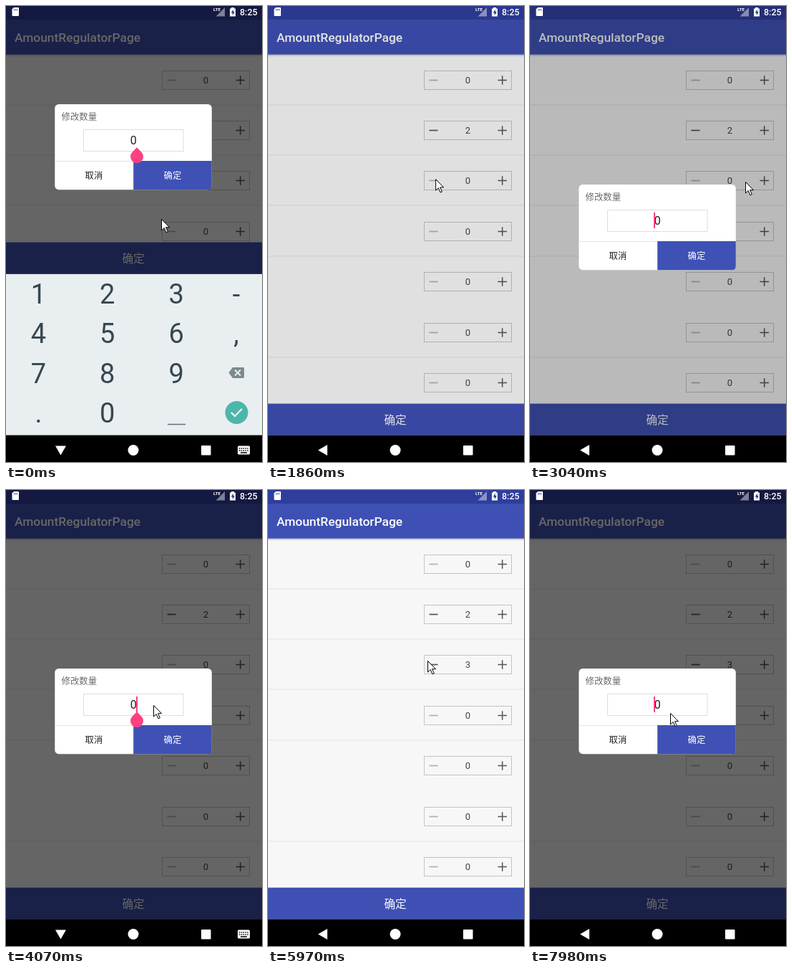
These frames come from a looping animation (358 by 636 pixels, 8 s). An HTML page:

```html
<!DOCTYPE html>
<html lang="zh">
<head>
<meta charset="utf-8">
<style>
html, body { margin: 0; width: 100%; height: 100%; overflow: hidden; background: #000; }
svg { display: block; width: 358px; height: 636px; font-family: Roboto, "Noto Sans CJK SC", "Noto Sans CJK", sans-serif; }
</style>
</head>
<body>
<svg id="stage" viewBox="0 0 358 636"></svg>
<script>
const LOOP = 8000, BLINK = 950, GLIDE = 400;
const BLUE = '#3f51b5', PINK = '#ff4081';
const HEADER_END = 67.7, NAV_TOP = 598.6, FOOTER_HEIGHT = 44, KEYPAD_HEIGHT = 225;

// Each edit opens the dialog, focuses the field, types a digit and closes with a press.
const EDITS = [
  { row: 1, digit: 2, open: -1600, focus: -600, type: 960, close: 1710 },
  { row: 2, digit: 3, open: 2930, focus: 3900, type: 4740, close: 5750 },
  { row: 3, digit: 0, open: 7020, focus: Infinity, type: Infinity, close: Infinity },
];

// The pointer glides to each stop and rests there from the given time on.
const STOPS = [
  { at: 0, x: 217, y: 297 }, { at: 1470, x: 234, y: 241 }, { at: 2250, x: 277, y: 345 },
  { at: 2640, x: 301, y: 245 }, { at: 3600, x: 206, y: 300 }, { at: 5170, x: 223, y: 238 },
  { at: 6670, x: 291, y: 310 }, { at: 7580, x: 196, y: 311 },
];

const progress = (t, start, length) => Math.min(1, Math.max(0, (t - start) / length));
const easeOut = p => 1 - (1 - p) ** 2;
const easeInOut = p => p * p * (3 - 2 * p);

const rect = (x, y, w, h, fill, extra = '') =>
  `<rect x="${x}" y="${y}" width="${w}" height="${h}" fill="${fill}" ${extra}/>`;
const circle = (x, y, r, fill) => `<circle cx="${x}" cy="${y}" r="${r}" fill="${fill}"/>`;
const path = (d, fill, extra = '') => `<path d="${d}" fill="${fill}" ${extra}/>`;
const line = (d, color, width = 1) => path(d, 'none', `stroke="${color}" stroke-width="${width}"`);
const label = (text, x, y, size, fill, extra = 'text-anchor="middle"') =>
  `<text x="${x}" y="${y}" font-size="${size}" fill="${fill}" ${extra}>${text}</text>`;
const group = (x, y, body, extra = '') => `<g transform="translate(${x} ${y})" ${extra}>${body}</g>`;

function quantityRow(i, value) {
  const body = (i === 4 ? '' : rect(0, 34.5, 358, 1, '#e8e8e8'))
    + rect(218.5, -12.5, 122, 26, 'none', 'stroke="#c6c6c6"')
    + line('M225.500 .5h12', value ? '#555' : '#b2b2b2', 1.7)
    + line('M321.500 .5h12.500M327.700 -5.800v12.600', '#555', 1.5)
    + label(value, 279.5, 5, 13, '#444');
  return group(0, Math.floor(103 + 70.42 * i), body);
}

function activity(t, keypadShown) {
  const footer = NAV_TOP - FOOTER_HEIGHT - KEYPAD_HEIGHT * keypadShown;
  const valueOf = i => EDITS.find(e => e.row === i && t >= e.close)?.digit ?? 0;
  const rows = Array.from({ length: 7 }, (_, i) => quantityRow(i, valueOf(i))).join('');
  const shadow = [.22, .1, .04].map((alpha, i) => rect(0, HEADER_END + i, 358, 1, '#000', `opacity="${alpha}"`));
  return rect(0, 0, 358, 599, '#fafafa') + rows + shadow.join('')
    + rect(0, 0, 358, 19, '#303f9f') + rect(0, 19, 358, HEADER_END - 19, BLUE)
    + label('AmountRegulatorPage', 12, 50, 17.4, '#fff', 'font-weight="500"')
    + rect(0, footer, 358, FOOTER_HEIGHT, BLUE) + label('确定', 178, footer + 28.3, 15.6, '#fff');
}

function statusBar() {
  return path('M11 2h6q1 0 1 1v10q0 1-1 1h-7.500q-1 0-1-1v-8.500z', '#fff')
    + line('M11.500 4v2.500M13.500 4v2.500M15.500 4v2.500', '#303f9f', .9)
    + label('LTE', 290, 7, 6.2, '#fff', 'font-weight="700"')
    + path('M306 2v12.500h-12.500z', '#fff', 'opacity=".45"')
    + path('M315 2h4v1.500h2v11h-8v-11h2z', '#fff') + path('M317.800 5l-3 4.500h2v3.500l3-4.700h-2z', '#222c6c')
    + label('8:25', 327, 13, 12.5, '#fff', 'font-weight="500"');
}

function navBar(open) {
  const keys = [0, 1, 2, 3, 4].map(i => `M${326 + i * 2.8} 617h1.500m-1.500 3h1.500`).join('');
  return rect(0, NAV_TOP, 358, 38, '#000')
    + path(open ? 'M69 613.500h15l-7.500 13z' : 'M70 619.500l13-7.500v15z', '#fff')
    + circle(178, 619.5, 7.5, '#fff')
    + rect(273, 613, 13.5, 13.5, '#fff', 'rx="1"')
    + (open ? rect(324, 613.5, 17, 12, '#fff', 'rx="1.5"') + line(keys + 'M328 623h9', '#000', 1.4) : '');
}

function keypad(shown) {
  if (!shown) return '';
  const keys = ['123-', '456,', '789', '.0'].map((row, r) => [...row].map((key, c) =>
    label(key, c === 3 ? 322 : 45.5 + 96.3 * c, 415 + 55.3 * r, 38, '#37474f')).join('')).join('');
  const body = rect(0, 374, 358, KEYPAD_HEIGHT, '#e9eef1') + keys
    + line('M226 583.500h25', '#607078', 1.5)
    + path('M311.500 511.500l5.500-7.500h14.500q1.500 0 1.500 1.500v12q0 1.500-1.500 1.500h-14.500z', '#7c898f')
    + line('M320 507.500l8 8M328 507.500l-8 8', '#e9eef1', 2)
    + circle(322.5, 567, 16, '#4db6ac') + line('M315 567l5 5 10-10', '#fff', 2);
  return group(0, KEYPAD_HEIGHT * (1 - shown), body);
}

function dialog(t, edit, rise) {
  const opacity = 1 - progress(t, edit.close, 120);
  if (!opacity) return '';
  const focused = t >= edit.focus, typed = t >= edit.type;
  const pressed = t >= edit.close - 60;
  const lastInput = typed ? edit.type : focused ? edit.focus : edit.open;
  const caretOn = (t - lastInput) % BLINK < BLINK / 2;
  const caretX = typed ? 187 : focused ? 183 : 174;
  const handle = focused ? 1 - progress(t, edit.type, 200) : 0;
  const body = rect(68.3, 0, 219.5, 119.2, '#fff', 'rx="5.5"')
    + label('修改数量', 77.5, 22, 12.4, '#6b6b6b', '')
    + rect(108.5, 35.5, 139.5, 30, '#fff', 'stroke="#dedede"')
    + label(typed ? '0' + edit.digit : '0', 178.3, 56, 16, '#222')
    + rect(68.3, 79, 219.5, 1, '#e4e4e4')
    + path('M178.200 79h109.600v34.700q0 5.500-5.500 5.500h-104.100z', pressed ? '#999' : BLUE)
    + label('取消', 123, 104, 12.4, '#222') + label('确定', 233, 104, 12.4, '#fff')
    + (caretOn ? rect(caretX - 1, 39, 2, 22, PINK) : '')
    + path('M183 60.300l6.360 6.360a9 9 0 1 1-12.720 0z', PINK, `opacity="${handle}"`);
  return group(0, 249 - 112 * rise, body, `opacity="${opacity}"`);
}

function pointer(t) {
  const i = STOPS.findLastIndex(stop => t >= stop.at - GLIDE);
  const to = STOPS[i], from = STOPS[i - 1] ?? to;
  const p = easeInOut(progress(t, to.at - GLIDE, GLIDE));
  const arrow = path('M.5.500v15.500l3.700-3.500 2.700 6.300 2.400-1-2.700-6.100h4.900z', '#fff', 'stroke="#000"');
  return group(from.x + (to.x - from.x) * p, from.y + (to.y - from.y) * p, arrow);
}

function scene(t) {
  const edit = EDITS.findLast(e => t >= e.open);
  const closed = t >= edit.close;
  const rise = easeOut(progress(t, edit.focus + 200, 240));
  const keypadShown = closed ? 0 : rise;
  const dim = .595 * easeOut(progress(t, edit.open, 450)) * (1 - easeOut(progress(t, edit.close, 260)));
  return activity(t, keypadShown)
    + rect(0, 0, 358, 599, '#000', `opacity="${dim}"`)
    + statusBar() + dialog(t, edit, rise) + keypad(keypadShown)
    + navBar(t >= edit.focus && !closed) + pointer(t);
}

const stage = document.getElementById('stage');
function frame() {
  stage.innerHTML = scene(performance.now() % LOOP);
  requestAnimationFrame(frame);
}
frame();
</script>
</body>
</html>
```
